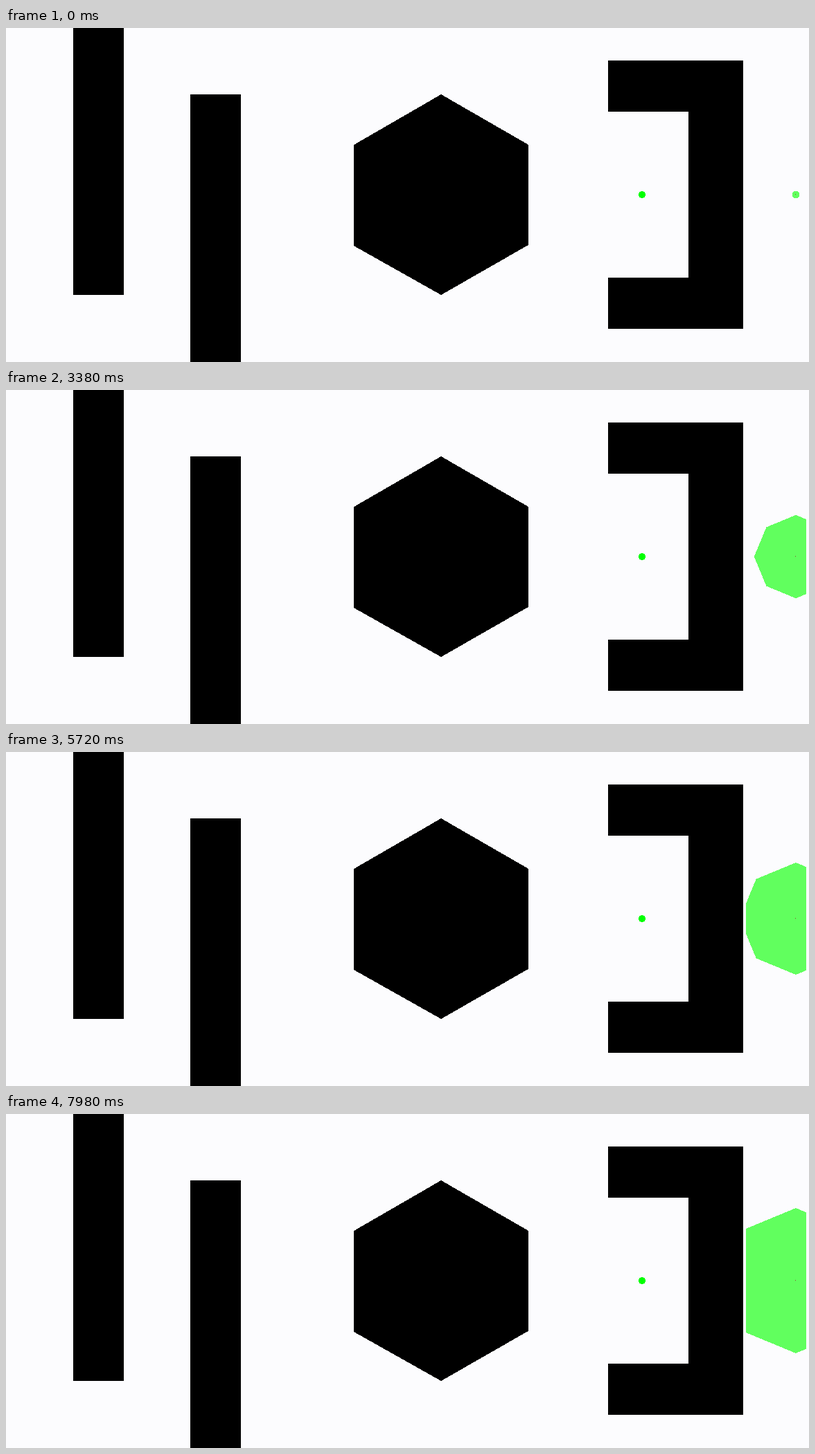
Animation, 1159 px wide and 483 px high, one loop 8 s. Source, as an HTML page:

```html
<!DOCTYPE html>
<html lang="en">
<head>
<meta charset="utf-8">
<title>Search wavefront</title>
<style>
  html, body { margin: 0; width: 100%; height: 100%; overflow: hidden; background: #fcfcfe; }
  svg { display: block; width: 1159px; height: 483px; }
</style>
</head>
<body>
<svg viewBox="0 0 1159 483" shape-rendering="crispEdges">
  <path d="M97 0H170V386H97Z M266 96H339V483H266Z
           M628 96L753.5 168.5V314L628 386L502 315V169Z
           M869 47H1063.5V434.5H869V361H985V121H869Z"/>
  <circle cx="918" cy="241" r="5" fill="#0f0"/>
  <g fill="#61ff5e">
    <circle cx="1140" cy="241" r="5.5"/>
    <polygon id="wave"/>
  </g>
  <rect x="1139" y="240" width="1" height="1" fill="#8a4a30"/>
</svg>
<script>
  const LOOP = 8000;
  const CENTER = { x: 1140, y: 241 };
  const LEFT = -72, RIGHT = 15;      // free corridor around the start point
  const AREA_PER_STEP = 93.7;
  const wave = document.getElementById('wave');

  // Half height of an octile-distance ball of radius r at offset x.
  function halfHeight(r, x) {
    const d = Math.abs(x);
    return Math.max(0, Math.min(r - (Math.SQRT2 - 1) * d, (Math.SQRT2 + 1) * (r - d)));
  }

  function clippedArea(r) {
    let area = 0;
    for (let x = LEFT + 0.5; x < RIGHT; x++) area += 2 * halfHeight(r, x);
    return area;
  }

  // The search visits equal area per step, so the radius follows from the area.
  function radiusFor(area) {
    let low = 0, high = 150;
    for (let i = 0; i < 24; i++) {
      const mid = (low + high) / 2;
      if (clippedArea(mid) < area) low = mid; else high = mid;
    }
    return low;
  }

  // Three steps per 140 ms, held for 20, 100 and 20 ms.
  function stepAt(time) {
    const phase = time % 140;
    return 3 * Math.floor(time / 140) + (phase < 20 ? 0 : phase < 120 ? 1 : 2);
  }

  function outline(r) {
    const corner = r * Math.SQRT1_2;
    const clamp = x => Math.max(LEFT, Math.min(RIGHT, x));
    const xs = [-r, -corner, 0, corner, r].map(clamp);
    const top = xs.map(x => [x, -halfHeight(r, x)]);
    const bottom = xs.map(x => [x, halfHeight(r, x)]).reverse();
    return [...top, ...bottom]
      .map(([x, y]) => `${(CENTER.x + x).toFixed(2)},${(CENTER.y + y).toFixed(2)}`)
      .join(' ');
  }

  let shownStep = -1;
  function draw(now) {
    const step = stepAt(now % LOOP);
    if (step !== shownStep) {
      shownStep = step;
      wave.setAttribute('points', outline(radiusFor(step * AREA_PER_STEP)));
    }
  }

  const start = performance.now();
  function tick() {
    draw(performance.now() - start);
    requestAnimationFrame(tick);
  }
  tick();
</script>
</body>
</html>
```
